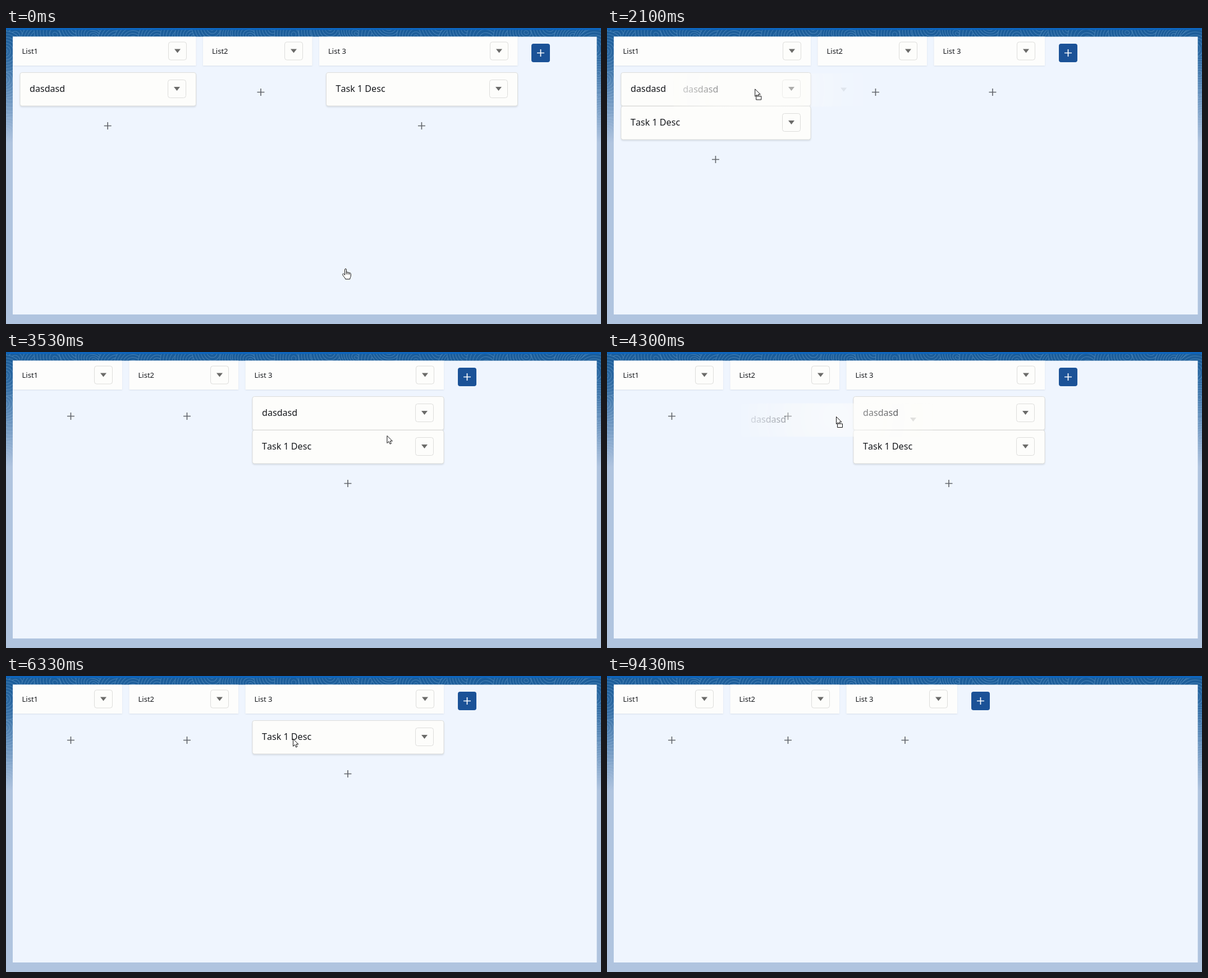
These frames come from a looping animation (1060x528 px, 9.46 s). An HTML page:

```html
<!DOCTYPE html>
<html lang="en">
<head>
<meta charset="utf-8">
<title>Task board</title>
<style>
  html, body { margin: 0; width: 100%; height: 100%; overflow: hidden; background: #b0c4df; }
  svg { display: block; width: 1060px; height: 528px; }
  text { font-family: "Noto Sans", "Open Sans", sans-serif; font-kerning: none; fill: #16181c; }
  .head { font-size: 13px; }
  .title { font-size: 16.1px; }
  .bar { fill: #fdfdfc; filter: drop-shadow(0 1.5px 1px rgba(60, 70, 90, .12)); }
  .card { fill: #fdfdfb; stroke: #dcdddb; filter: drop-shadow(0 2px 1px rgba(60, 70, 80, .13)); }
  .box { fill: #fdfdfb; stroke: #dddddb; }
  #ghost .card, #ghost .box { stroke: none; filter: none; }
  .arrow { fill: #6b6b69; }
  .hot .arrow { fill: #174f96; }
  .plus { fill: none; stroke: #62656a; stroke-width: 1.6; }
  .add { fill: #1b5297; }
  .addSign { fill: none; stroke: #fff; stroke-width: 1.7; }
  .cursor { fill: #fff; stroke: #111; stroke-width: 1; stroke-linejoin: round; }
</style>
</head>
<body>
<svg viewBox="0 0 1060 528">
  <defs>
    <linearGradient id="fade" x1="0" y1="0" x2="0" y2="1">
      <stop offset="0" stop-color="#b0c4df" stop-opacity="0"/>
      <stop offset=".25" stop-color="#b0c4df" stop-opacity=".14"/>
      <stop offset="1" stop-color="#b0c4df"/>
    </linearGradient>
    <radialGradient id="glow" gradientUnits="userSpaceOnUse" r="230">
      <stop offset="0" stop-color="#fff" stop-opacity=".6"/>
      <stop offset=".35" stop-color="#fff" stop-opacity=".42"/>
      <stop offset=".5" stop-color="#fff" stop-opacity=".28"/>
      <stop offset=".68" stop-color="#fff" stop-opacity=".12"/>
      <stop offset="1" stop-color="#fff" stop-opacity=".02"/>
    </radialGradient>
    <mask id="soft" maskUnits="userSpaceOnUse" x="0" y="0" width="1060" height="528">
      <rect width="1060" height="528" fill="url(#glow)"/>
    </mask>
    <clipPath id="top"><rect width="1060" height="205"/></clipPath>
    <clipPath id="inside"><rect x="12" y="15.5" width="1040.5" height="495.5"/></clipPath>
  </defs>
  <rect width="1060" height="528" fill="#b0c4df"/>
  <g clip-path="url(#top)">
    <rect width="1060" height="205" fill="#195b98"/>
    <g id="contours" fill="#195b98" stroke="#6fa3cf" stroke-opacity=".5"/>
    <rect width="1060" height="205" fill="url(#fade)"/>
    <rect width="1060" height="3.5" fill="#0d65bd"/>
  </g>
  <rect x="12" y="15.5" width="1040.5" height="495.5" fill="#eff5fe"/>
  <g id="board" clip-path="url(#inside)"></g>
  <g id="ghost" mask="url(#soft)"></g>
  <g id="pointer">
    <path id="arrow" class="cursor" d="M.5 .5V13.5L3.6 10.7 5.7 15.2 7.9 14.2 5.9 9.9H10Z"/>
    <rect id="load" class="cursor" x="2.5" y="13" width="9" height="6.5"/>
    <path id="hand" class="cursor" d="M-1.4 .9C-1.4-1 1.4-1 1.4 .9V6C1.6 4.8 4 4.9 4.1 6.6 4.5 5.4 6.7 5.7 6.8 7.3 7.3 6.4 9.3 6.8 9.3 8.6V12C9.3 14 8 15 7.6 18H-.2C-.6 15.6-3.8 13.4-5.2 10.3-6 8.5-3.7 7.4-2.6 9.2L-1.4 10.7ZM1.4 6V9.4M4.1 6.6V9.6M6.8 7.3V9.9"/>
  </g>
</svg>
<script>
const LOOP = 9460;
const GAP = 12.5;
const NAMES = ["List1", "List2", "List 3"];
const A = "dasdasd", B = "Task 1 Desc";

// Time, then the cards of each list.
const BOARDS = [
  [0, [A], [], [B]],
  [1300, [A, B], [], []],
  [2450, [B], [], [A]],
  [3500, [], [], [A, B]],
  [4550, [], [A], [B]],
  [6300, [], [], [B]],
  [8100, [], [], []]
];

// Start, end, grab point, card.
const DRAGS = [
  [560, 1300, 659, 104.5, B],
  [1970, 2450, 170, 107, A],
  [3050, 3500, 160, 107, B],
  [3900, 4550, 608, 103, A]
];

// Time and place of the pointer.
const PATH = [
  [0, 605, 430], [500, 659, 104.5], [560, 659, 104.5],
  [1170, 181, 88], [1300, 165, 96], [1770, 170, 107], [1970, 170, 107],
  [2450, 680, 115], [2730, 427, 174], [3000, 160, 107], [3050, 160, 107],
  [3500, 680, 150], [3850, 608, 103], [3900, 608, 103],
  [4300, 408, 115], [4550, 320, 112], [5200, 511, 175], [5500, 511, 110],
  [6500, 511, 112], [7330, 746, 110], [8230, 745, 112], [8470, 745, 112],
  [8870, 1000, 529]
];

const $ = id => document.getElementById(id);
const last = (rows, t) => rows.findLast(row => row[0] <= t);
const show = (id, on) => $(id).style.display = on ? "" : "none";

function drawContours() {
  let seed = 17;
  const rnd = () => (seed = seed * 16807 % 2147483647) / 2147483647;
  let out = "";
  for (let i = 0; i < 44; i++) {
    const side = i > 31;
    const x = side ? (i % 2 ? 1056 : 6) + rnd() * 24 - 12 : i * 35 + rnd() * 20 - 20;
    const y = side ? 25 + rnd() * 170 : rnd() * 34 - 8;
    const stretch = .7 + rnd() * .6;
    const turn = rnd() * 80 - 40;
    for (let r = 34; r > 3; r -= 5) {
      out += `<ellipse cx="${x}" cy="${y}" rx="${r}" ry="${r * stretch}" transform="rotate(${turn} ${x} ${y})"/>`;
    }
  }
  $("contours").innerHTML = out;
}

const sign = (x, y, r, cls) =>
  `<path class="${cls}" d="M${x - r} ${y}h${2 * r}M${x} ${y - r}v${2 * r}"/>`;

function menuButton(left, y) {
  const x = Math.floor(left);
  return `<g class="menu" data-x="${x}" data-y="${y}">
    <rect class="box" x="${x + .5}" y="${y + .5}" width="32" height="32" rx="4"/>
    <path class="arrow" d="M${x + 11} ${y + 13}h11l-5.5 7z"/></g>`;
}

function card({ x, y, w, name }) {
  return `<rect class="card" x="${x}" y="${y}" width="${w}" height="59.5" rx="3.5"/>
    <text class="title" x="${x + 17}" y="${y + 34.5}">${name}</text>` +
    menuButton(x + w - 50.5, y + 12.5);
}

function layout(lists) {
  let x = 12.5;
  const cols = lists.map((names, i) => {
    const base = names.includes(B) ? 350.5 : names.length ? 326 : 194.5;
    const w = base + (i === 2 ? 3 : 0);
    const cards = names.map((name, n) => ({ name, x: x + 12.5, y: 79.5 + 60 * n, w: w - 12.5 }));
    const col = { x, w, cards };
    x += w + GAP;
    return col;
  });
  return { cols, end: x - GAP };
}

function boardMarkup({ cols, end }) {
  let out = "";
  cols.forEach(({ x, w, cards }, i) => {
    out += `<rect class="bar" x="${x}" y="12" width="${w}" height="55"/>
      <text class="head" x="${x + 16}" y="45.5">${NAMES[i]}</text>` +
      menuButton(x + w - 49.5, 24.5) +
      cards.map(card).join("") +
      sign(x + 5.7 + w / 2, 114.5 + 60 * cards.length, 6.5, "plus");
  });
  const x = Math.round(end + 24.5);
  return out + `<rect class="add" x="${x}" y="28" width="33" height="33" rx="4"/>` +
    sign(x + 16.5, 44.5, 6.5, "addSign");
}

function pointerAt(t) {
  const i = PATH.findLastIndex(p => p[0] <= t);
  const a = PATH[i], b = PATH[i + 1];
  if (!b) return null;
  const u = (t - a[0]) / (b[0] - a[0]);
  const k = u * u * (3 - 2 * u);
  return [a[1] + (b[1] - a[1]) * k, a[2] + (b[2] - a[2]) * k];
}

let board, drag, plan;

function setBoard(next) {
  board = next;
  plan = layout(board.slice(1));
  $("board").innerHTML = boardMarkup(plan);
}

function setDrag(next) {
  drag = next;
  show("ghost", drag);
  if (!drag) return;
  const [, , gx, gy, name] = drag;
  const source = plan.cols.flatMap(c => c.cards).find(c => c.name === name);
  $("ghost").innerHTML = card(source);
  $("glow").setAttribute("cx", gx);
  $("glow").setAttribute("cy", gy);
}

function render(t) {
  const nextBoard = last(BOARDS, t);
  if (nextBoard !== board) setBoard(nextBoard);
  const nextDrag = DRAGS.find(d => t >= d[0] && t < d[1]) || null;
  if (nextDrag !== drag) setDrag(nextDrag);

  const pos = pointerAt(t);
  show("pointer", pos);
  let hot = false;
  for (const el of $("board").querySelectorAll(".menu")) {
    const dx = pos ? pos[0] - el.dataset.x : -1;
    const dy = pos ? pos[1] - el.dataset.y : -1;
    const over = !drag && dx >= 0 && dx <= 33 && dy >= 0 && dy <= 33;
    el.classList.toggle("hot", over);
    hot = hot || over;
  }
  if (!pos) return;

  const hand = !drag && (hot || t < 560);
  show("hand", hand);
  show("arrow", !hand);
  show("load", drag);
  $("pointer").setAttribute("transform", `translate(${pos})`);
  if (drag) $("ghost").setAttribute("transform", `translate(${pos[0] - drag[2]} ${pos[1] - drag[3]})`);
}

drawContours();
const start = performance.now();
function tick() {
  render((performance.now() - start) % LOOP);
  requestAnimationFrame(tick);
}
tick();
</script>
</body>
</html>
```
